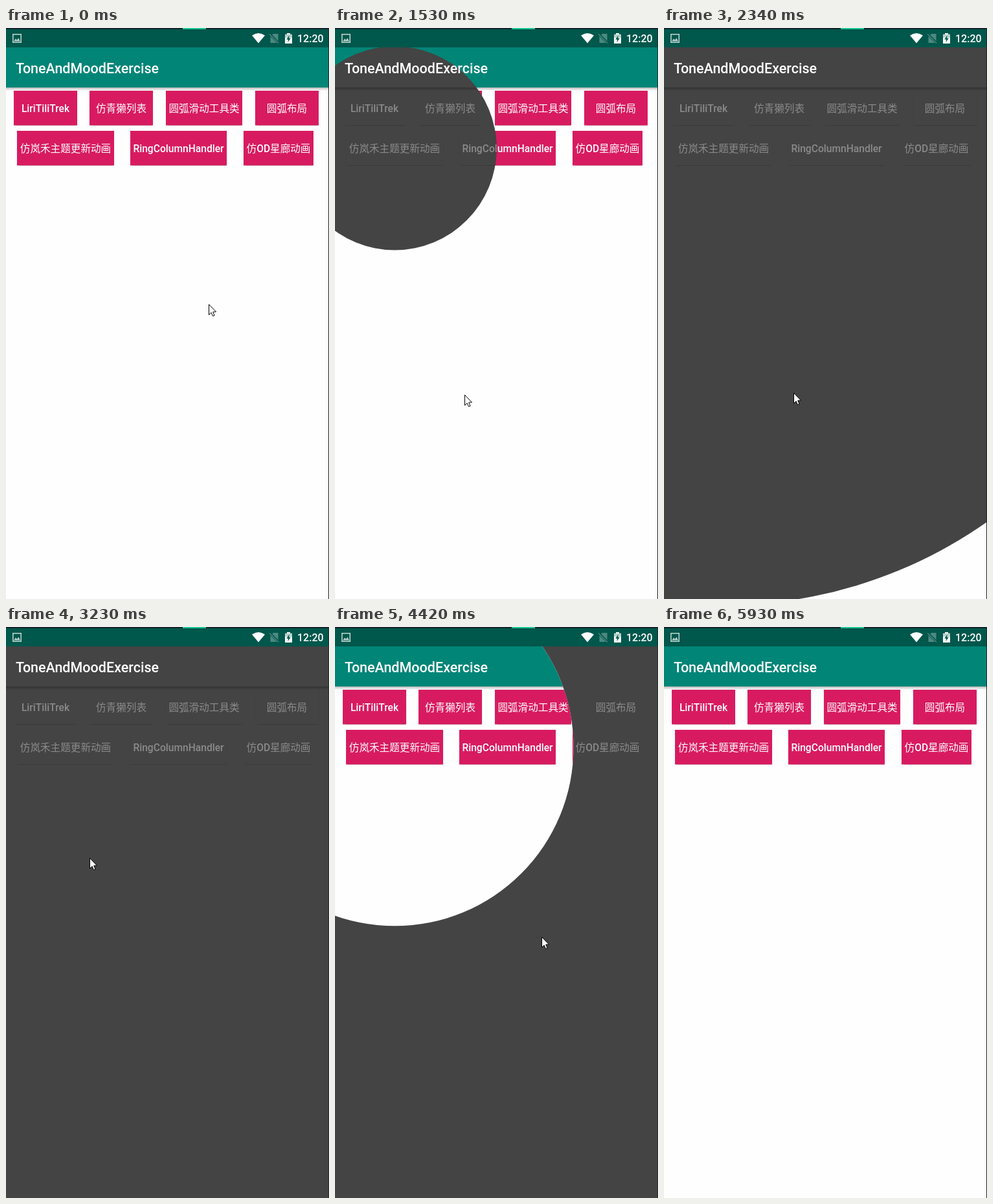
An HTML page with a canvas for the animation above (6120 ms loop, 499x883 px).

```html
<!DOCTYPE html>
<html lang="zh">
<head>
<meta charset="utf-8">
<title>Circular theme reveal</title>
<style>
  html, body { margin: 0; width: 100%; height: 100%; overflow: hidden; background: #fff; }
  canvas { display: block; }
</style>
</head>
<body>
<canvas id="stage" width="499" height="883"></canvas>
<script>
const ctx = document.getElementById('stage').getContext('2d');
const W = 499, H = 883, LOOP = 6120;
const STATUS_H = 30, BAR_BOTTOM = 92, BUTTON_H = 53.5;
const LATIN = '"Roboto", sans-serif';
const HAN = '"Noto Sans CJK SC", "Noto Sans CJK", sans-serif';
const STATUS = '#00574b';
const LIGHT = { bar: '#008577', page: '#fefefe', button: '#d81b60', text: '#fff' };
const DARK = { bar: '#444', page: '#444', button: '#444', text: '#8a8a8a' };

const ROWS = [
  { x: 12, y: 97, gap: 19.4, names: ['LiriTiliTrek', '仿青獭列表', '圆弧滑动工具类', '圆弧布局'] },
  { x: 17.4, y: 159, gap: 25.2, names: ['仿岚禾主题更新动画', 'RingColumnHandler', '仿OD星廊动画'] }
];

// The radius grows with the square of the time since start.
const ORIGIN = { x: 92.3, y: 186, radius: 75 };
const TO_DARK = { from: 1065, start: 1073, rate: 0.01982 };
const TO_LIGHT = { from: 3715, start: 3684, rate: 0.01925 };

const POINTER_HOME = { x: 313, y: 427 }, POINTER_GONE = 5920;
const MOVES = [
  { from: 360, to: 950, x: 66, y: 202 },
  { from: 1070, to: 1530, x: 200, y: 567 },
  { from: 1700, to: 2290, x: 200, y: 564 },
  { from: 2880, to: 3530, x: 74, y: 194 },
  { from: 3720, to: 3950, x: 328, y: 460 },
  { from: 3950, to: 4420, x: 319, y: 479 },
  { from: 5290, to: 5640, x: 281, y: 862 },
  { from: 5640, to: 5930, x: 476, y: 875 }
];

function rect(color, x, y, w, h) {
  ctx.fillStyle = color;
  ctx.fillRect(x, y, w, h);
}

function shape(color, ...points) {
  ctx.beginPath();
  points.forEach(([x, y]) => ctx.lineTo(x, y));
  ctx.closePath();
  ctx.fillStyle = color;
  ctx.fill();
}

function line(color, width, x0, y0, x1, y1) {
  ctx.strokeStyle = color;
  ctx.lineWidth = width;
  ctx.beginPath();
  ctx.moveTo(x0, y0);
  ctx.lineTo(x1, y1);
  ctx.stroke();
}

function text(str, x, y, size, color) {
  ctx.font = `500 ${size}px ${LATIN}`;
  ctx.fillStyle = color;
  ctx.fillText(str, x, y);
}

// Splits a label into Latin and Han runs, each with its own font.
function toRuns(str) {
  return str.match(/[\x20-\x7e]+|[^\x20-\x7e]+/g).map(part => {
    const font = part.charCodeAt(0) < 128 ? `500 15.6px ${LATIN}` : `400 15.6px ${HAN}`;
    ctx.font = font;
    return { part, font, width: ctx.measureText(part).width };
  });
}

function layOutRow({ x, y, gap, names }) {
  return names.map(name => {
    const runs = toRuns(name);
    const textWidth = runs.reduce((sum, run) => sum + run.width, 0);
    const width = Math.max(98, textWidth + 9.3);
    const button = { runs, textWidth, x: Math.round(x), y, width: Math.round(width) };
    x += width + gap;
    return button;
  });
}

const buttons = ROWS.flatMap(layOutRow);

function drawButton({ runs, textWidth, x, y, width }, theme, shadows) {
  ctx.save();
  if (shadows) {
    ctx.shadowColor = 'rgba(0,0,0,.28)';
    ctx.shadowBlur = 1.5;
    ctx.shadowOffsetY = 0.6;
  }
  rect(theme.button, x, y, width, BUTTON_H);
  ctx.restore();

  let left = x + (width - textWidth) / 2;
  ctx.fillStyle = theme.text;
  for (const run of runs) {
    ctx.font = run.font;
    ctx.fillText(run.part, left, y + 33);
    left += run.width;
  }
}

function drawPage(theme, shadows) {
  rect(theme.page, 0, STATUS_H, W, H - STATUS_H);
  rect(theme.bar, 0, STATUS_H, W, BAR_BOTTOM - STATUS_H);
  text('ToneAndMoodExercise', 15, 70, 21.5, '#fff');
  if (shadows) {
    const fade = ctx.createLinearGradient(0, BAR_BOTTOM, 0, BAR_BOTTOM + 5);
    fade.addColorStop(0, 'rgba(0,0,0,.27)');
    fade.addColorStop(1, 'rgba(0,0,0,0)');
    rect(fade, 0, BAR_BOTTOM, W, 5);
  }
  buttons.forEach(button => drawButton(button, theme, shadows));
}

function drawStatusBar() {
  const pale = '#b9d0cc', dim = '#4d8980';
  rect(STATUS, 0, 0, W, STATUS_H);

  // picture
  ctx.strokeStyle = pale;
  ctx.lineWidth = 1.6;
  ctx.strokeRect(10.8, 9.8, 12.4, 12.4);
  shape(pale, [12, 20.5], [15, 16.5], [17, 18.8], [19.2, 15.5], [22, 20.5]);

  // wireless
  ctx.beginPath();
  ctx.moveTo(390, 23.5);
  ctx.lineTo(380, 11.5);
  ctx.quadraticCurveTo(390, 4.5, 400, 11.5);
  ctx.fillStyle = '#fff';
  ctx.fill();

  // missing card
  shape(dim, [413, 9], [420.5, 9], [420.5, 23], [408.5, 23], [408.5, 13]);
  line(STATUS, 3.6, 407, 9, 421, 23);
  line(dim, 1.3, 407, 9.5, 421, 23.5);

  // battery
  rect('#fff', 434, 8, 5, 2);
  rect(pale, 431, 9.7, 11, 5);
  rect('#fff', 431, 14.5, 11, 9.5);
  shape(STATUS, [437.5, 11.5], [433.3, 17.8], [436, 17.8], [435.5, 22], [439.8, 15.8], [437.2, 15.8]);

  text('12:20', 450, 22, 16, '#fff');
}

function drawEdges() {
  rect('#14232b', 0, 0, W, 2);
  rect('#1fc795', 273, 0, 36, 2);
  rect('#20242c', W - 1, 0, 1, H);
}

function pointerAt(t) {
  let { x, y } = POINTER_HOME;
  for (const move of MOVES) {
    const p = Math.min(1, Math.max(0, (t - move.from) / (move.to - move.from)));
    const eased = p * p * (3 - 2 * p);
    x += (move.x - x) * eased;
    y += (move.y - y) * eased;
  }
  return { x, y };
}

function drawPointer(t) {
  if (t >= POINTER_GONE) return;
  const { x, y } = pointerAt(t);
  ctx.save();
  ctx.translate(Math.round(x) + 0.5, Math.round(y) + 0.5);
  shape('#fff', [0, 0], [0, 16], [3.6, 12.6], [6, 18], [8.6, 17], [6.2, 11.6], [11, 11.4]);
  ctx.strokeStyle = '#000';
  ctx.lineWidth = 1;
  ctx.stroke();
  ctx.restore();
}

function drawReveal(theme, { start, rate }, t) {
  const radius = ORIGIN.radius + (rate * Math.max(0, t - start)) ** 2;
  ctx.save();
  ctx.beginPath();
  ctx.arc(ORIGIN.x, ORIGIN.y, radius, 0, Math.PI * 2);
  ctx.clip();
  drawPage(theme, true);
  ctx.restore();
}

function draw(t) {
  if (t < TO_LIGHT.from) {
    drawPage(LIGHT, true);
    if (t >= TO_DARK.from) drawReveal(DARK, TO_DARK, t);
  } else {
    drawPage(DARK, false);
    drawReveal(LIGHT, TO_LIGHT, t);
  }
  drawStatusBar();
  drawPointer(t);
  drawEdges();
}

const begin = performance.now();
function loop() {
  draw((performance.now() - begin) % LOOP);
  requestAnimationFrame(loop);
}
loop();
</script>
</body>
</html>
```
